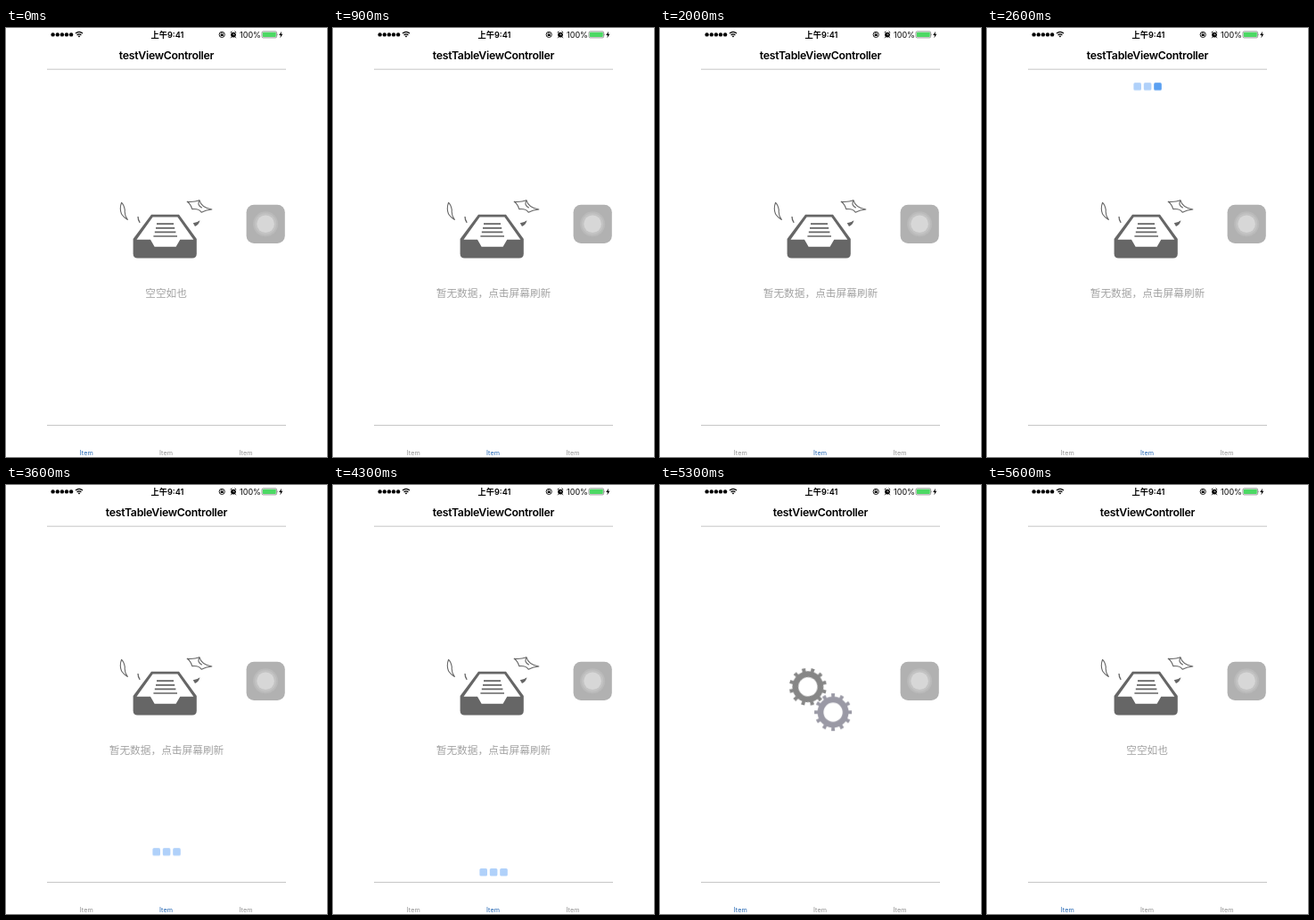
Recreate the animation shown at these times as an HTML page. Size 360 by 480 pixels, loop 6 s.

```html
<!DOCTYPE html>
<html lang="zh-CN">
<head>
<meta charset="utf-8">
<title>Empty view states</title>
<style>
html, body { margin: 0; width: 100%; height: 100%; overflow: hidden; background: #fff; }
svg { display: block; width: 100vw; height: 100vh; }
text { text-anchor: middle; font-family: Inter, "Noto Sans CJK SC", "Noto Sans CJK", sans-serif; }
.time { font-size: 9.2px; font-weight: 600; }
.power { font-size: 9px; }
.title { font-size: 12.3px; font-weight: 600; letter-spacing: -.27px; }
.label { font: 11.7px "Noto Sans CJK SC", "Noto Sans CJK", sans-serif; fill: #a3a3a3; }
.tab { font-size: 7.2px; letter-spacing: .1px; fill: #929292; }
.on { fill: #2668b4; }

/* every cue runs on one 6 s clock with hard changes */
.first, .second, .third, .idle, .busy, .dots, .dots rect, .bar { animation: 6s step-end infinite; }
.first { animation-name: first; }
.second { animation-name: second; }
.third { animation-name: third; }
.idle { animation-name: idle; }
.busy { animation-name: busy; }
.dots { animation-name: pull; }
.dots rect { fill: #b0d1fa; }
.dots .d1 { animation-name: d1; }
.dots .d2 { animation-name: d2; }
.dots .d3 { animation-name: d3; }
.bar { animation-name: bar; }

@keyframes first { 0%, 76.66% { opacity: 1 } 6.66% { opacity: 0 } 100% { opacity: 1 } }
@keyframes second { 0%, 76.66%, 100% { opacity: 0 } 15% { opacity: 1 } }
@keyframes third { 0%, 15%, 100% { opacity: 0 } 6.66% { opacity: 1 } }
@keyframes idle { 0%, 33.33%, 93.33%, 100% { opacity: 1 } 23.33%, 83.33% { opacity: 0 } }
@keyframes busy { 0%, 33.33%, 93.33%, 100% { opacity: 0 } 23.33%, 83.33% { opacity: 1 } }
@keyframes pull {
  0%, 55%, 73.33%, 100% { transform: translateY(30px); opacity: 0 }
  38.33% { transform: translateY(46px); opacity: 1 }
  40% { transform: translateY(81px); opacity: 1 }
  41.66% { transform: translateY(68px); opacity: 1 }
  43.33% { transform: translateY(61.2px); opacity: 1 }
  53.33% { transform: translateY(60px); opacity: 1 }
  58.33% { transform: translateY(433px); opacity: 1 }
  60% { transform: translateY(406.2px); opacity: 1 }
  61.66% { transform: translateY(415px); opacity: 1 }
  63.33% { transform: translateY(422px); opacity: 1 }
  65% { transform: translateY(424.3px); opacity: 1 }
  71.66% { transform: translateY(429px); opacity: 1 }
}
@keyframes d1 {
  0%, 53.33%, 63.33%, 100% { fill: #b0d1fa }
  51.66%, 61.66% { fill: #599ff1 }
}
@keyframes d2 {
  0%, 43.33%, 51.66%, 65%, 71.66%, 100% { fill: #b0d1fa }
  41.66%, 46.66%, 63.33%, 70% { fill: #599ff1 }
}
@keyframes d3 {
  0%, 46.66%, 70%, 100% { fill: #b0d1fa }
  43.33%, 65% { fill: #599ff1 }
}
@keyframes bar {
  0%, 65%, 100% { opacity: 0 }
  61.66% { opacity: .35 }
  63.33% { opacity: .2 }
}

/* one tooth pitch per turn of the loop */
.gear { fill: none; animation: turn .6s steps(6) -.4s infinite; }
.back { animation-direction: normal; animation-name: unturn; }
@keyframes turn { from { transform: rotate(1deg) } to { transform: rotate(31deg) } }
@keyframes unturn { from { transform: rotate(15deg) } to { transform: rotate(-15deg) } }
</style>
</head>
<body>
<svg viewBox="0 0 360 480">
  <defs>
    <clipPath id="page"><rect x="46" y="46.5" width="268" height="397.5"/></clipPath>
    <g id="gear">
      <circle r="14.1" stroke-width="6.8"/>
      <circle r="18.9" stroke-width="4.2" pathLength="12" stroke-dasharray=".4 .6" stroke-dashoffset=".2"/>
    </g>
  </defs>

  <!-- status bar -->
  <g>
    <circle cx="52.6" cy="7.4" r="2.2"/><circle cx="57.8" cy="7.4" r="2.2"/><circle cx="62.9" cy="7.4" r="2.2"/><circle cx="68" cy="7.4" r="2.2"/><circle cx="73.1" cy="7.4" r="2.2"/>
    <g fill="none" stroke="#000" stroke-width="1.3">
      <path d="M78 6.1Q82 2.7 86 6.1M79.6 7.9Q82 5.9 84.4 7.9"/>
      <circle cx="242.2" cy="7.4" r="3.1" stroke-width=".9"/>
      <path d="M241.2 7V6.2a1 1 0 0 1 2 0V7" stroke-width=".6"/>
      <path d="M251.8 5.2L253.4 3.7M258.2 5.2L256.6 3.7M253 10.2l-.9 1M257 10.2l.9 1" stroke-width="1"/>
    </g>
    <path d="M80.6 9.1Q82 8 83.4 9.1L82 10.6Z"/>
    <rect x="240.7" y="6.8" width="3" height="2.2"/>
    <circle cx="255" cy="7.6" r="2.9"/>
    <path d="M255 5.9V7.7H256.5" fill="none" stroke="#fff" stroke-width=".6"/>
    <text class="time" x="181" y="10.8">上午9:41</text>
    <text class="power" x="274" y="10.6">100%</text>
    <rect x="287" y="3.9" width="16.6" height="7" rx="1.4" fill="#fff" stroke="#555" stroke-width=".6"/>
    <rect x="287.8" y="4.7" width="15" height="5.4" rx=".8" fill="#4cd964"/>
    <path d="M304.3 6.2q1.1 1.2 0 2.4Z" fill="#555"/>
    <path d="M309 3.8L306.2 7.9H308L307.4 11.2L310.4 6.8H308.5Z"/>
  </g>

  <path d="M46 46.2H314M46 444.5H314" stroke="#c6c6c6" stroke-width="1"/>

  <!-- tab pages -->
  <g class="first">
    <text class="title" x="180" y="34.6">testViewController</text>
    <text class="label idle" x="179.6" y="301.3">空空如也</text>
    <text class="tab" y="477.6"><tspan class="on" x="90.3">Item</tspan><tspan x="179.6">Item</tspan><tspan x="269">Item</tspan></text>
  </g>
  <g class="second">
    <text class="title" x="180" y="34.6">testTableViewController</text>
    <text class="label idle" x="180" y="301.3">暂无数据，点击屏幕刷新</text>
    <text class="tab" y="477.6"><tspan x="90.3">Item</tspan><tspan class="on" x="179.6">Item</tspan><tspan x="269">Item</tspan></text>
  </g>
  <g class="third">
    <text class="title" x="180" y="34.6">testCollectionViewController</text>
    <text class="label" x="180" y="301.3">暂无数据，点击屏幕刷新</text>
    <text class="tab" y="477.6"><tspan x="90.3">Item</tspan><tspan x="179.6">Item</tspan><tspan class="on" x="269">Item</tspan></text>
  </g>

  <!-- empty tray -->
  <g class="idle" fill="#666">
    <path d="M163 208.8H194L213.8 236V252.5Q213.8 257.5 208.8 257.5H147.6Q142.6 257.5 142.6 252.5V236Z"/>
    <path d="M164.6 211.4H192.4L210.3 236.8H195.3L190.6 244.8H166.6L162 236.8H146.5Z" fill="#fff"/>
    <path d="M169 219.1H188M168 223.8H189.2M166.8 228.4H190.4M165.4 233H192" stroke="#666" stroke-width="1.7"/>
    <g fill="none" stroke="#666" stroke-width="1.1" stroke-linejoin="round">
      <path d="M129.6 195.3Q127 202 129.6 208.3Q132 212 136.3 214.4Q132.6 209.6 133.3 203.6Q132.4 198 129.6 195.3Z"/>
      <path d="M203.2 194.3Q210.5 195.2 217 192.8Q219 200.8 230.9 203Q224.5 203.4 219.2 206.2Q216.6 202 208.8 202.6Q207 197 203.2 194.3Z"/>
      <path d="M217 192.8Q213.6 198 219.8 201.2"/>
      <path d="M148 211Q148 215 150.2 217.8" stroke-width="1.3"/>
    </g>
    <path d="M209.8 218.2Q214 218 217.4 215.2Q216.8 219.6 212 222Z"/>
  </g>

  <!-- loading gears -->
  <g class="busy">
    <g transform="translate(165.9 225.8)"><g class="gear" stroke="#868686"><use href="#gear"/></g></g>
    <g transform="translate(194.1 254.2)"><g class="gear back" stroke="#9a99a5"><use href="#gear"/></g></g>
  </g>

  <!-- pull indicators -->
  <g clip-path="url(#page)">
    <g class="dots">
      <rect class="d1" x="164.4" width="8.6" height="8.6" rx="1.6"/>
      <rect class="d2" x="175.8" width="8.6" height="8.6" rx="1.6"/>
      <rect class="d3" x="187.2" width="8.6" height="8.6" rx="1.6"/>
    </g>
    <rect class="bar" x="310.2" y="73.2" width="1.8" height="368.8" rx=".9"/>
  </g>

  <!-- floating button -->
  <rect x="269.6" y="197.8" width="43.2" height="43.2" rx="8.5" fill="#b1b1b1"/>
  <circle cx="291.1" cy="219.3" r="14" fill="#bababa"/>
  <circle cx="291.1" cy="219.3" r="12" fill="#c3c3c3"/>
  <circle cx="291.1" cy="219.3" r="9.8" fill="#d7d7d7"/>
</svg>
</body>
</html>
```
